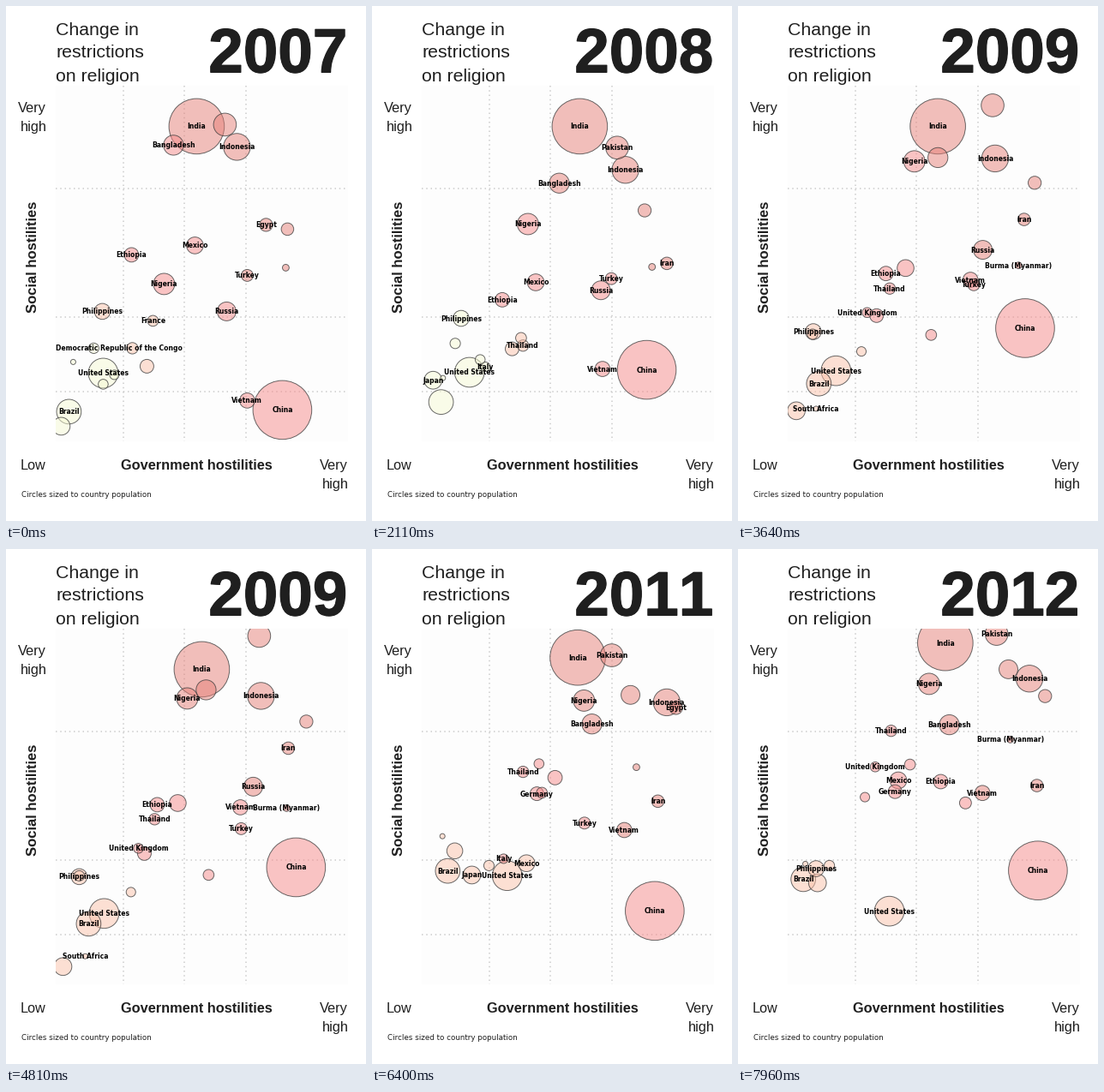
Animation of 420x601 px, one loop 8000 ms. Source, as a matplotlib script:

```python
import numpy as np
import matplotlib.pyplot as plt
from matplotlib.animation import FuncAnimation
from matplotlib.patches import Circle, Rectangle
import matplotlib.patheffects as pe

W, H, DPI = 420, 601, 100
INTERVAL, LOOP = 40, 8000
PX = 72 / DPI
INK = "#1f1f1f"
LEFT, TOP, RIGHT, BOTTOM = 58, 93, 399, 508
COLUMNS, ROWS = (137, 208, 279.5), (450, 362.5, 212.5)

LOW, MODERATE, HIGH, TOPMOST = "#f7fad4", "#fcc2ab", "#f78a8a", "#e68078"
RAMP = [LOW, LOW, MODERATE, HIGH, HIGH, TOPMOST, TOPMOST]

# Each year's move ends at its arrival time
ARRIVE = np.array([2320, 3780, 5290, 6680, 8170])
MOVE, STEP, YEAR_LEAD = 500, 70, 420
# The set of visible labels changes at these times
PHASES = dict(zip("ABCDEF", (0, 1870, 2320, 3360, 6250, 7750)))

fig = plt.figure(figsize=(W / DPI, H / DPI), dpi=DPI, facecolor="white")
ax = fig.add_axes([0, 0, 1, 1])
ax.set_xlim(0, W)
ax.set_ylim(H, 0)
ax.axis("off")

plot = Rectangle((LEFT, TOP), RIGHT - LEFT, BOTTOM - TOP, fc="#fdfdfd", ec="none", zorder=0)
ax.add_patch(plot)


def write(x, y, s, size, **kw):
    kw = {"family": "Liberation Sans", "color": INK, "va": "baseline", **kw}
    return ax.text(x, y, s, fontsize=size * PX, **kw)


def dotted(xs, ys):
    ax.plot(xs, ys, color="#cbcbcb", lw=1.5 * PX, ls=(0, (1, 2.5)),
            dash_capstyle="butt", zorder=1)


for x in COLUMNS:
    dotted((x, x), (TOP, BOTTOM))
for y in ROWS:
    dotted((LEFT, RIGHT), (y, y))

for i, line in enumerate(("Change in", "restrictions", "on religion")):
    write(58, 33.5 + 27 * i, line, 21.3)
for x, y in ((14, 124), (366, 541)):
    write(x, y, "Very", 16.4)
    write(x + 2.5, y + 22, "high", 16.4)
write(17, 541, "Low", 16.2)
write(134.5, 541, "Government hostilities", 16.4, weight="bold")
write(36, 358, "Social hostilities", 16.6, weight="bold", rotation=90, rotation_mode="anchor")
write(18, 573, "Circles sized to country population", 8.75, family="DejaVu Sans")

digits = [write(236.3 + 40.5 * i, 77.4, "", 72.8, weight="bold",
                path_effects=[pe.withStroke(linewidth=1.2 * PX, foreground=INK)])
          for i in range(4)]

bubbles = []
_ = None  # a year on the straight line between its neighbours


class Bubble:
    """One country, with yearly key points x + yj; listed by population."""

    def __init__(self, name, *path, labels="ABCDEF", r=None):
        known = [i for i, p in enumerate(path) if p is not None]
        self.path = np.interp(range(len(path)), known, [path[i] for i in known])
        self.labels = labels
        bubbles.append(self)
        r = r or 23.7 - 5.8 * np.log(len(bubbles))
        self.dot = Circle((0, 0), r, lw=0.95 * PX, ec=(0.25, 0.25, 0.25, 0.8), zorder=2)
        ax.add_patch(self.dot)
        self.dot.set_clip_path(plot)
        self.label = write(0, 0, name, 7.6, family="DejaVu Sans", weight="bold",
                           color="black", ha="center", zorder=3)
        self.half = self.label.get_window_extent().width / 2

    def update(self, phase, year, moves):
        pos = self.path[0] + moves @ np.diff(self.path)
        x, y = pos.real + 0.4, pos.imag + 0.4
        level = sum(x > c for c in COLUMNS) + sum(y < r for r in ROWS)
        if year >= 2009:
            level = max(level, 2)
        self.dot.center = x, y
        self.dot.set_facecolor((RAMP[level], 0.5))
        self.label.set_visible(phase in self.labels)
        self.label.set_position((max(x, LEFT + self.half), y + 3))


Bubble("China", 322+471j, 319+396j, 338+371j, 314+426j, 352+416j, 348+350j, r=34.3)
Bubble("India", 222+140j, 254+140j, 228+140j, 239+132j, _, 242+104j, r=32.3)
Bubble("United States", 113+428j, _, 114+425j, 151+367j, _, 182+435j)
Bubble("Indonesia", 269+164j, 311+207j, 297+171j, 350+209j, 334+134j, 343+161j)
Bubble("Brazil", 73+473j, _, 96+437j, 92+372j, _, 72+388j, labels="ADEF")
Bubble("Pakistan", 255+138j, 304+181j, 295+101j, 272+132j, _, 308+91j, labels="BCEF")
Bubble("Nigeria", 184+324j, 180+212j, 211+174j, 255+183j, _, 215+151j)
Bubble("Bangladesh", 195+162j, 232+233j, 233+164j, 248+166j, 268+259j, 233+172j, labels="ABEF")
Bubble("Russia", 257+356j, _, 288+277j, 304+204j, 297+120j, 326+152j, labels="ABCD")
Bubble("Japan", 64+490j, 75+404j, 66+487j, 124+377j, _, 85+392j, labels="BCE")
Bubble("Mexico", 220+279j, 173+348j, 200+296j, 179+359j, 181+377j, 190+205j, labels="ABCEF")
Bubble("Philippines", 112+356j, _, 85+382j, 98+345j, _, 89+379j, labels="ABCDF")
Bubble("Vietnam", 281+460j, 261+401j, 273+301j, 297+342j, _, 282+271j)
Bubble("Ethiopia", 146+290j, 155+374j, 176+298j, 203+303j, 228+213j, 241+306j, labels="ABDF")
Bubble("Germany", 164+420j, _, 161+355j, 195+286j, _, 180+282j, labels="CEF")
Bubble("Egypt", 303+255j, _, 350+201j, _, _, 359+167j, labels="ACE")
Bubble("Iran", 328+260j, 353+324j, 329+232j, 328+300j, _, 353+270j, labels="BCDEF")
Bubble("Turkey", 281+314j, _, 274+326j, 256+306j, 235+339j, 283+270j, labels="ABCDE")
Bubble("Thailand", 147+399j, 193+394j, 173+315j, _, _, 179+197j, labels="BCDEF")
Bubble("France", 171+367j, 175+399j, 236+380j, 197+295j, _, 201+241j, labels="AC")
Bubble("Democratic Republic of the Congo", 102+399j, _, 85+381j, 146+369j, _, 97+369j, labels="A")
Bubble("United Kingdom", 113+441j, _, 154+349j, 206+249j, _, 149+255j, labels="DF")
Bubble("Italy", 126+430j, _, _, 155+385j, _, 146+267j, labels="BCE")
Bubble("Burma (Myanmar)", 326+305j, _, 327+302j, 305+265j, _, 320+212j, labels="DF", r=3.9)
Bubble("South Africa", 78+415j, _, 92+475j, 83+324j, _, 77+377j, labels="D", r=3)


def swing(t):
    """Cosine ease of every move, advancing in steps up to its arrival."""
    left = np.ceil((ARRIVE - t) / STEP) * STEP
    return 0.5 - 0.5 * np.cos(np.pi * np.clip(1 - left / MOVE, 0, 1))


def update(i):
    t = i * INTERVAL + 30
    year = 2007 + int(np.sum(t >= ARRIVE - YEAR_LEAD))
    phase = max(p for p, start in PHASES.items() if t >= start)
    moves = swing(t)
    for digit, char in zip(digits, str(year)):
        digit.set_text(char)
    for b in bubbles:
        b.update(phase, year, moves)
    return []


anim = FuncAnimation(fig, update, frames=LOOP // INTERVAL, interval=INTERVAL,
                     repeat=True, repeat_delay=0)
plt.show()
```
